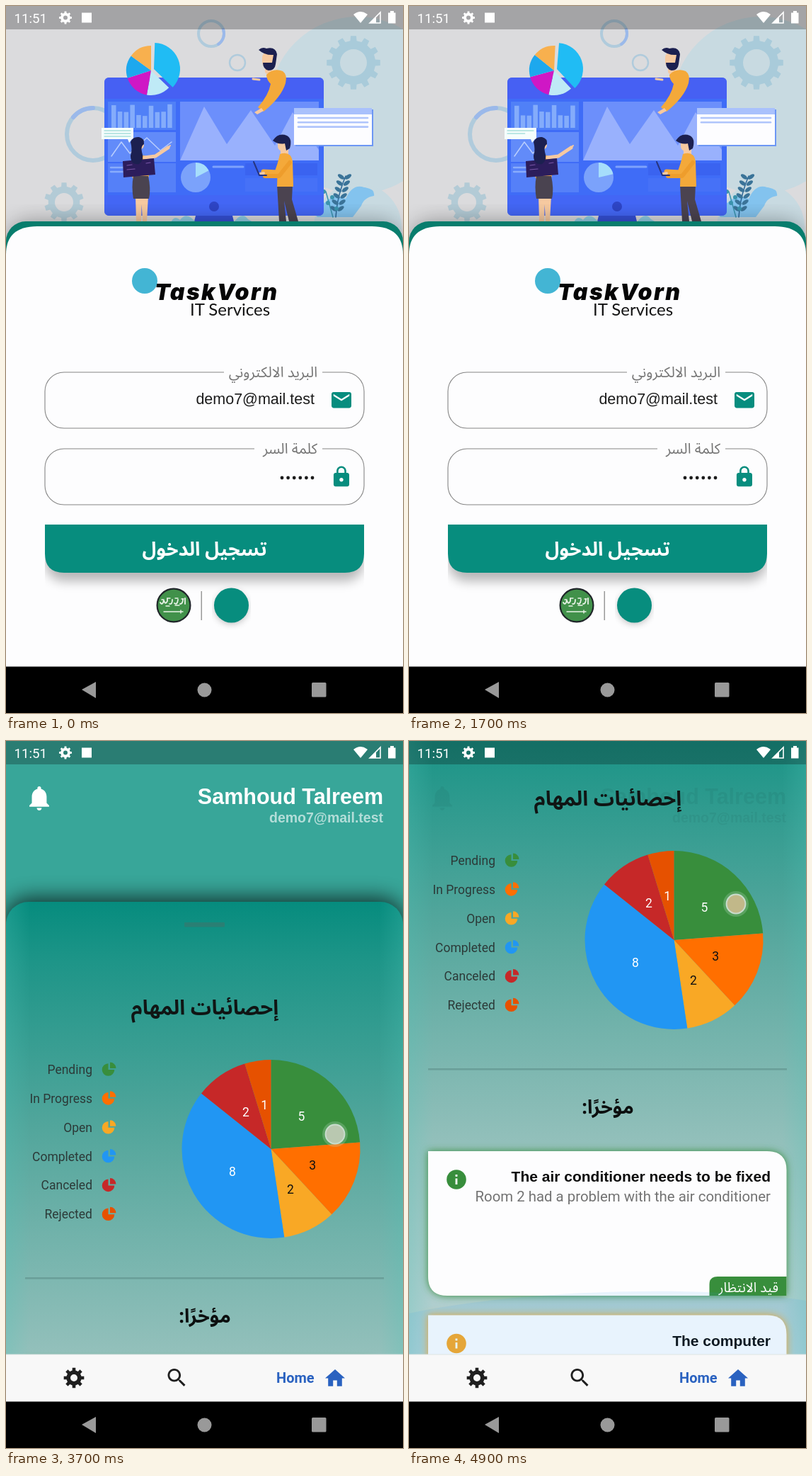
Recreate the animation shown at these times as an HTML page. Size 561 by 998 pixels, loop 5 s.

```html
<!DOCTYPE html>
<html lang="en">
<head>
<meta charset="utf-8">
<title>Task app walkthrough</title>
<style>
html, body { margin: 0; width: 100%; height: 100%; overflow: hidden; background: #000; }
svg { display: block; width: 100vw; height: 100vh; }
.sans { font-family: "Liberation Sans", Arial, sans-serif; }
.ui { font-family: Roboto, sans-serif; }
.ar { font-family: "Noto Sans Arabic", "DejaVu Sans", sans-serif; direction: rtl; }
.brand { font-family: Inter, sans-serif; font-style: italic; font-weight: 900; letter-spacing: 2.4px; }
.thin { font-family: Lato, sans-serif; }
.b { font-weight: 700; }
.end { text-anchor: end; }
.mid { text-anchor: middle; }
</style>
</head>
<body>
<svg id="stage" viewBox="0 0 561 998" preserveAspectRatio="none" xmlns="http://www.w3.org/2000/svg">
  <defs>
    <filter id="soft" x="-20%" y="-20%" width="140%" height="140%"><feGaussianBlur stdDeviation="15"/></filter>
    <filter id="glow" x="-10%" y="-20%" width="120%" height="140%"><feGaussianBlur stdDeviation="5.5"/></filter>
    <filter id="drop" x="-20%" y="-40%" width="140%" height="180%"><feGaussianBlur stdDeviation="8"/></filter>
    <linearGradient id="sheetFill" gradientUnits="userSpaceOnUse" x1="0" y1="227" x2="0" y2="1177">
      <stop offset="0" stop-color="#068c7e"/>
      <stop offset=".09" stop-color="#1e9588"/>
      <stop offset=".35" stop-color="#55a79d"/>
      <stop offset=".67" stop-color="#93c0bb"/>
      <stop offset="1" stop-color="#bad3d5"/>
    </linearGradient>
    <linearGradient id="edge">
      <stop offset="0" stop-color="#4fc4b8" stop-opacity=".25"/>
      <stop offset=".06" stop-color="#4fc4b8" stop-opacity="0"/>
      <stop offset=".94" stop-color="#4fc4b8" stop-opacity="0"/>
      <stop offset="1" stop-color="#4fc4b8" stop-opacity=".25"/>
    </linearGradient>
    <clipPath id="btnClip"><rect x="55" y="780" width="451" height="60"/></clipPath>
    <clipPath id="bodyClip"><rect width="561" height="866"/></clipPath>
  </defs>
  <g id="login"><g id="art"></g><g id="form"></g></g>
  <g id="home" clip-path="url(#bodyClip)">
    <g id="header"></g>
    <g id="sheet"></g>
    <g id="over"></g>
  </g>
  <g id="tabs"></g>
  <g id="system"></g>
</svg>
<script>
const LOOP = 5000, STEP = 100, SWITCH = 2400;
const TEAL = '#078d7e', SKIN = '#f6c9a0', ORANGE = '#f4a93a', INK = '#1c2050';
const MAIL = 'demo7@mail.test', PERSON = 'Samhoud Talreem';
const $ = id => document.getElementById(id);
const clamp = v => Math.max(0, Math.min(1, v));

const rect = (x, y, w, h, fill, rx = 0, extra = '') =>
  `<rect x="${x}" y="${y}" width="${w}" height="${h}" rx="${rx}" fill="${fill}" ${extra}/>`;
const disc = (x, y, r, fill, extra = '') => `<circle cx="${x}" cy="${y}" r="${r}" fill="${fill}" ${extra}/>`;
const path = (d, fill, extra = '') => `<path d="${d}" fill="${fill}" ${extra}/>`;
const line = (d, color, w, extra = '') =>
  path(d, 'none', `stroke="${color}" stroke-width="${w}" stroke-linecap="round" stroke-linejoin="round" ${extra}`);
const text = (x, y, s, size, cls, fill, extra = '') =>
  `<text x="${x}" y="${y}" font-size="${size}" class="${cls}" fill="${fill}" ${extra}>${s}</text>`;
const icon = (x, y, k, d, fill) => path(d, fill, `transform="translate(${x} ${y}) scale(${k})"`);

function polar(x, y, r, deg) {
  const a = (deg - 90) * Math.PI / 180;
  return [x + r * Math.cos(a), y + r * Math.sin(a)].map(v => v.toFixed(2));
}
function slice(x, y, r, from, to, fill) {
  return path(`M${x} ${y}L${polar(x, y, r, from)}A${r} ${r} 0 ${+(to - from > 180)} 1 ${polar(x, y, r, to)}Z`, fill);
}
function gear(x, y, r, hole, teeth, fill, inner = .78) {
  const pts = [], gap = 360 / teeth;
  for (let i = 0; i < teeth; i++)
    for (const [k, q] of [[-.28, inner], [-.2, 1], [.2, 1], [.28, inner]])
      pts.push(polar(x, y, r * q, (i + k) * gap));
  const ring = `M${x - hole} ${y}a${hole} ${hole} 0 1 0 ${2 * hole} 0a${hole} ${hole} 0 1 0 ${-2 * hole} 0Z`;
  return path(`M${pts.join('L')}Z${ring}`, fill, 'fill-rule="evenodd"');
}
function track(t, keys) {
  if (t <= keys[0][0]) return keys[0][1];
  for (let i = 1; i < keys.length; i++) {
    const [t0, a] = keys[i - 1], [t1, b] = keys[i];
    if (t <= t1) return a + (b - a) * (t - t0) / (t1 - t0);
  }
  return keys[keys.length - 1][1];
}

function backdrop() {
  return rect(0, 0, 561, 380, '#dbdbdd') +
    disc(497, 140, 125, '#c8dae1') + disc(497, 312, 62, '#c8dae1') +
    `<g fill="none" stroke="#b0cbdc">
      <circle cx="123" cy="181" r="37" stroke-width="6"/>
      <circle cx="290" cy="39" r="18" stroke-width="4"/>
      <circle cx="327" cy="80" r="11" stroke-width="2.5"/></g>` +
    line('M95 157A37 37 0 0 1 123 144', '#9bb9ea', 6) +
    line('M307 33A18 18 0 0 1 300 54', '#9bb9ea', 4) +
    gear(491, 80, 38, 19, 12, '#a9cbda', .82) +
    gear(82, 277, 28, 13, 10, '#b3cbd6', .8);
}
function monitor(t, phase) {
  const grow = (a, b) => clamp((phase - a) / (b - a));
  let s = rect(139, 101, 310, 195, '#3f6cf7', 7) +
    path('M139 131V108Q139 101 146 101H442Q449 101 449 108V131Z', '#4660f3') +
    rect(144, 135, 96, 40, '#5080f7') + rect(144, 178, 96, 42, '#628bf9') + rect(144, 222, 96, 41, '#5580f8') +
    rect(246, 135, 196, 83, '#6c8ffb') +
    path('M246 218L280 142 312 195 346 147 380 197 405 150 442 203V218Z', '#99b1fd') +
    rect(338, 222, 102, 17, '#3a63f0') + rect(338, 243, 102, 19, '#4671f7') +
    path('M139 267H449V289Q449 296 442 296H146Q139 296 139 289Z', '#4366f5') +
    line('M293 227H335', '#7ea2fc', 3);
  for (let i = 0; i < 10; i++) {
    const h = 24 + 8 * Math.sin(i * 2.1 + 1.5) + 3 * Math.sin(t / 500 + i);
    s += rect(149 + i * 8.8, 172 - h, 6.5, h, '#84acfb');
  }
  s += line('M149 212L163 192 175 208 199 186 218 204 234 192', '#b9cefe', 1.5,
      `pathLength="100" stroke-dasharray="${8 + 92 * grow(300, 1300)} 200"`) +
    line(`M148 228H${172 + 28 * grow(300, 1000)}M148 234H${160 + 26 * grow(300, 1300)}`, '#89acfc', 2.5) +
    disc(268, 242, 21, '#7ba2fb') + slice(268, 242, 21, 0, 90 - 28 * grow(300, 1400), '#a6ddfb') +
    disc(294, 283, 7, '#2e45c6') + path('M268 296H320L324 312H264Z', '#3550d6') +
    path('M232 308Q237 294 246 302Q256 288 270 308ZM320 308Q333 288 342 301L354 308Z', '#8fcde4');
  return s;
}
function artPie(t) {
  const turn = 6 * clamp((t - 1200) / 1100);
  const parts = [[134, 190, '#bfeaf6'], [190, 252, '#cf17c5'], [252, 306, '#1da8ee'], [306, 360, '#f8b04e']];
  return parts.map(([a, b, c]) => slice(205, 91, 35, a + turn, b + turn, c)).join('') +
    slice(209, 89, 37, 2 + turn, 134 + turn, '#20bcf4');
}
function popups(phase) {
  let s = rect(409, 146, 110, 52, '#6d97f4') + rect(407, 144, 110, 52, '#fdfdff') + rect(407, 144, 110, 9, '#a9c1fc');
  [[0, 300], [300, 800], [800, 1300]].forEach(([a, b], i) => {
    const k = clamp((phase - a) / (b - a));
    if (k) s += line(`M413 ${158 + i * 6.3}H${413 + 98 * k}`, '#b0c5fb', 2.6);
  });
  s += path('M135 172H180V188H178L174 193 172 188H135Z', '#f5fdfc');
  for (let i = 0; i < 3; i++) {
    const k = clamp((phase - 300 - i * 300) / 300);
    if (k) s += line(`M139 ${176 + i * 4}H${139 + 37 * k}`, '#a8dfdc', 1.3);
  }
  return s;
}
function people() {
  const climber =
    rect(366, 80, 11, 16, SKIN, 4) +
    path('M368 97Q378 87 391 92Q398 97 395 109Q389 129 364 149L356 143Q371 126 374 110Q368 104 368 97Z', ORANGE) +
    path('M361 144L351 150 355 153 364 148Z', SKIN) +
    rect(362, 64, 19, 24, SKIN, 9) +
    path('M357 62Q362 57 368 60Q381 57 383 68L381 82Q380 91 371 91Q363 89 363 80L376 80 378 69Q366 70 357 62Z', INK) +
    line('M349 103L358 104', SKIN, 3);
  const woman =
    path('M183 268H192L191 304H184ZM191 268H201L199 304H193Z', SKIN) +
    rect(178, 211, 24, 36, '#f0a94a', 8) + line('M196 214L211 212 229 200', SKIN, 5) + line('M228 201L232 197', SKIN, 2) +
    path('M180 240H201Q205 258 202 272H180Q177 255 180 240Z', '#4a4350') +
    path('M165 219L209 215 211 238 166 242Z', '#2c1d5c') +
    line('M171 225L178 224M171 231L182 230M198 222L204 221', '#7b56a8', 1.2) +
    disc(188, 196, 7, SKIN) +
    path('M176 192Q179 184 188 185Q196 187 195 195Q190 198 192 206Q196 217 188 223Q176 225 176 211Q179 203 176 192Z', INK);
  const man =
    path('M383 252H405L404 273 413 304H400L393 275 396 304H386Z', '#4b4350') +
    rect(388, 199, 11, 13, SKIN, 4) + rect(384, 186, 15, 19, SKIN, 7) +
    path('M377 190Q385 178 397 183Q405 187 401 201L396 204 394 194Q385 196 377 190Z', INK) +
    path('M387 209Q402 204 405 219L406 255H383L384 222Z', ORANGE) +
    line('M389 217L383 235 364 234', ORANGE, 7) + line('M401 221L386 240 366 240', '#ee9d2c', 6) +
    line('M364 236L359 237', SKIN, 4) + line('M350 220L358 239H368', '#27357f', 2);
  return climber + woman + man;
}
function plants() {
  let s = path('M428 284Q436 268 450 278Q464 264 480 272Q490 250 506 256Q522 258 520 268Q506 270 502 282L490 298H440Z', '#83c3ee') +
    line('M466 298Q468 268 480 240', '#2d6798', 1.5) + line('M462 298L452 262', '#3b93ad', 1.5);
  for (let i = 0; i < 6; i++) {
    const x = 468 + i * 2.1, y = 288 - i * 9;
    for (const d of [-1, 1])
      s += `<ellipse cx="${x + d * 5}" cy="${y - 2}" rx="5.4" ry="2.6" fill="#3a7398" transform="rotate(${d * -35} ${x + d * 5} ${y - 2})"/>`;
  }
  for (let i = 0; i < 4; i++) s += disc(453 + i * 3 + (i % 2 ? 5 : -4), 262 + i * 8, 3, '#3b93ad');
  return s;
}
function art(t) {
  const phase = (t + 1500) % 2400;
  return backdrop() + plants() + monitor(t, phase) + popups(phase) + artPie(t) + people();
}

function field(y, notch, label) {
  return rect(55, y, 451, 79, 'none', 27, 'stroke="#858585" stroke-width="1.1"') +
    rect(notch, y - 2, 447 - notch, 4, '#fdfdfe') + text(440, y + 7, label, 20.4, 'ar', '#757575');
}
function form() {
  let s = rect(0, 304, 561, 120, '#000', 34, 'opacity=".34" filter="url(#soft)"') +
    rect(0, 304, 561, 640, '#087d6d', 28) +
    path('M0 351Q0 311 44 311H517Q561 311 561 351V933H0Z', '#fdfdfe') +
    disc(196, 388, 18, '#43b5d4') +
    text(210, 415, 'TaskVorn', 32, 'brand', '#050505') +
    text(260, 437, 'IT Services', 24, 'thin', '#151515') +
    field(517, 308, 'البريد الالكتروني') + field(625, 351, 'كلمة السر') +
    text(436, 562, MAIL, 21.5, 'sans end', '#1c1c1c') +
    icon(457.2, 539.4, 1.4, 'M20 4H4c-1.1 0-2 .9-2 2v12c0 1.1.9 2 2 2h16c1.1 0 2-.9 2-2V6c0-1.1-.9-2-2-2zm0 4l-8 5-8-5V6l8 5 8-5z', TEAL) +
    icon(457.4, 648, 1.38, 'M18 8h-1V6c0-2.76-2.24-5-5-5S7 3.24 7 6v2H6c-1.1 0-2 .9-2 2v10c0 1.1.9 2 2 2h12c1.1 0 2-.9 2-2V10c0-1.1-.9-2-2-2zm-6 9c-1.1 0-2-.9-2-2s.9-2 2-2 2 .9 2 2-.9 2-2 2zm3.1-9H8.9V6c0-1.71 1.39-3.1 3.1-3.1s3.1 1.39 3.1 3.1z', TEAL);
  for (let i = 0; i < 6; i++) s += disc(390 + i * 8.6, 666, 2.4, '#1c1c1c');
  s += `<g clip-path="url(#btnClip)">${rect(55, 744, 451, 68, '#000', 27, 'opacity=".28" filter="url(#drop)"')}</g>` +
    path('M55 732H506V773Q506 800 479 800H82Q55 800 55 773Z', TEAL) +
    text(280.5, 775.5, 'تسجيل الدخول', 27, 'ar b mid', '#fff') +
    disc(237, 846, 23.4, '#41914a', 'stroke="#20262a" stroke-width="2.2"') +
    line('M218 842q3 5 5-3q2 7 5 1v-4m3 8q4 1 4-6m3 5q4 3 5-5m3 6q4 0 4-7m3 7v-8', '#e9f3e8', 1.8) +
    line('M220 838h3m6-2h3m7 0h4m5 1h3M226 847h5m8-1h6', '#e9f3e8', 1.4) +
    line('M223 855H250M247 853V857', '#e9f3e8', 1.4) +
    rect(275.5, 826, 1.5, 41, '#999') +
    disc(318.5, 849, 22.5, '#000', 'opacity=".3" filter="url(#glow)"') + disc(318.5, 846, 24.5, TEAL);
  return s;
}

const BELL = icon(26.1, 59.7, 1.74, 'M12 22c1.1 0 2-.9 2-2h-4c0 1.1.9 2 2 2zm6-6v-5c0-3.07-1.63-5.64-4.5-6.32V4c0-.83-.67-1.5-1.5-1.5s-1.5.67-1.5 1.5v.68C7.64 5.36 6 7.92 6 11v5l-2 2v1h16v-1l-2-2z', 'currentColor');
const who = mailAlpha => BELL + text(533, 89, PERSON, 30.5, 'sans b end', 'currentColor') +
  text(533, 115, MAIL, 19.5, 'sans b end', 'currentColor', `opacity="${mailAlpha}"`);

const STATS = [['Pending', 5, '#388e3c', '#fff'], ['In Progress', 3, '#ff6f00', '#111'], ['Open', 2, '#f9a825', '#111'],
  ['Completed', 8, '#2196f3', '#fff'], ['Canceled', 2, '#c62828', '#fff'], ['Rejected', 1, '#e65100', '#fff']];

function chart() {
  const total = STATS.reduce((n, s) => n + s[1], 0);
  let a = 0, s = '';
  STATS.forEach(([name, n, color, ink], i) => {
    const b = a + 360 * n / total, y = 464 + i * 40.85;
    const [lx, ly] = polar(374.5, 576, 63, (a + b) / 2);
    s += slice(374.5, 576, 126, a, b, color) + text(lx, +ly + 6, n, 17.5, 'ui mid', ink) +
      text(122, y + 6, name, 17.5, 'ui end', '#2c3a38') +
      slice(144.5, y, 8.8, 90, 360, color) + slice(147, y - 2, 8.5, 0, 90, color);
    a = b;
  });
  return s;
}
function card(y, color, title, sub, tag) {
  const d = `M27 ${y}H506Q533.5 ${y} 533.5 ${y + 27}V${y + 204}H54Q27 ${y + 204} 27 ${y + 177}Z`;
  return path(d, color, 'filter="url(#glow)"') + path(d, '#fdfdfe') +
    disc(67, y + 40, 13.8, color) + rect(65.6, y + 38.5, 2.8, 8.5, '#fff') + rect(65.6, y + 33, 2.8, 2.9, '#fff') +
    text(511, y + 43, title, 21, 'sans b end', '#0c0c0c') + text(511, y + 71, sub, 20.4, 'ui end', '#737373') +
    path(`M424.5 ${y + 204}V${y + 188}Q424.5 ${y + 177} 436 ${y + 177}H533.5V${y + 204}Z`, color) +
    text(522, y + 198.5, tag, 19, 'ar', '#fff');
}
function sheet() {
  const shape = fill => rect(0, 227, 561, 1300, fill, 32);
  return rect(0, 222, 561, 1300, '#000', 32, 'opacity=".72" filter="url(#soft)"') +
    shape('url(#sheetFill)') + shape('url(#edge)') +
    rect(252, 256, 57, 6.5, '#2a7f74', 1) +
    '<g id="ghost" color="#000" opacity=".05"></g>' +
    text(281, 386, 'إحصائيات المهام', 29, 'ar b mid', '#101514') + chart() +
    rect(27, 757, 507, 2.6, '#6a9f99') +
    text(281, 821, 'مؤخرًا:', 27, 'ar b mid', '#0c0f0f') +
    card(874, '#388e3c', 'The air conditioner needs to be fixed', 'Room 2 had a problem with the air conditioner', 'قيد الانتظار') +
    card(1105.5, '#f9a825', 'The computer', '', '');
}
function tabs() {
  return rect(0, 866, 561, 67, '#f8f8f8') + rect(0, 865.5, 561, 1, '#dfe5e4') +
    gear(96, 899, 14.5, 5, 8, '#1f1f1f', .74) +
    icon(224.2, 881.7, 1.43, 'M15.5 14h-.79l-.28-.27C15.41 12.59 16 11.11 16 9.5 16 5.91 13.09 3 9.5 3S3 5.91 3 9.5 5.91 16 9.5 16c1.61 0 3.09-.59 4.23-1.57l.27.28v.79l5 4.99L20.49 19l-4.99-5zm-6 0C7.01 14 5 11.99 5 9.5S7.01 5 9.5 5 14 7.01 14 9.5 11.99 14 9.5 14z', '#1f1f1f') +
    text(382, 906, 'Home', 20, 'ui b', '#2a62c0') +
    icon(448.2, 882.8, 1.4, 'M10 20v-6h4v6h5v-8h3L12 3 2 12h3v8z', '#2a62c0');
}
function system() {
  return rect(0, 0, 561, 33, '#000', 0, 'opacity=".25"') + text(11.5, 23.5, '11:51', 18.7, 'ui', '#fff') +
    gear(84, 16.5, 9, 3, 8, '#fff', .76) + rect(107, 9.5, 14, 14, '#fff') +
    path('M491 12Q501 4 511 12L501 24Z', '#fff') +
    path('M514 24L529 9V24Z', 'none', 'stroke="#fff" stroke-width="1.6"') + path('M514 24L523 15V24Z', '#fff') +
    path('M540 9.5H543V7H548V9.5H550.5V24.5H540Z', '#fff') +
    rect(0, 932.5, 561, 66, '#000') + path('M107 965L127 954V977Z', '#999') +
    disc(280.5, 965.5, 10, '#999') + rect(432, 955, 20.5, 20.5, '#999', 1.5);
}
function over(t) {
  let s = '';
  const pull = clamp((t - 4600) / 300);
  if (pull) {
    const y = 866 - 76 * pull;
    s += path(`M0 ${y + 18}C150 ${y - 14} 400 ${y - 24} 561 ${y}V866H0Z`, '#2196f3', `opacity="${.095 * pull}"`);
  }
  if (t >= 3600) {
    const x = track(t, [[4100, 465], [4500, 462]]);
    const y = track(t, [[3700, 555], [4100, 440], [4500, 260], [4900, 230]]);
    s += disc(x, y, 18, '#b4d8bd', 'opacity=".28"') +
      disc(x, y, 13.4, t > 4600 ? '#c7ba8c' : '#bfcab5', 'stroke="#cfe0d3" stroke-width="2" opacity=".95"');
  }
  return s;
}

$('form').innerHTML = form();
$('header').innerHTML = rect(0, 0, 561, 400, '#38a699') + `<g color="#fff">${who(.62)}</g>`;
$('sheet').innerHTML = sheet();
$('ghost').innerHTML = who(1);
$('tabs').innerHTML = tabs();
$('system').innerHTML = system();

function draw(t) {
  const home = t >= SWITCH;
  $('login').style.display = home ? 'none' : '';
  $('home').style.display = $('tabs').style.display = home ? '' : 'none';
  if (!home) { $('art').innerHTML = art(t); return; }
  const lift = track(t, [[3700, 0], [3900, 45], [4100, 107], [4300, 197], [4500, 278], [4700, 295]]);
  $('sheet').setAttribute('transform', `translate(0 ${-lift})`);
  // The header shows through only once the sheet fully covers it.
  $('ghost').setAttribute('transform', `translate(0 ${lift})`);
  $('ghost').style.display = lift > 200 ? '' : 'none';
  $('over').innerHTML = over(t);
}

const start = performance.now();
let last = -1;
function tick() {
  const t = Math.floor((performance.now() - start) % LOOP / STEP) * STEP;
  if (t !== last) draw(last = t);
  requestAnimationFrame(tick);
}
tick();
</script>
</body>
</html>
```
